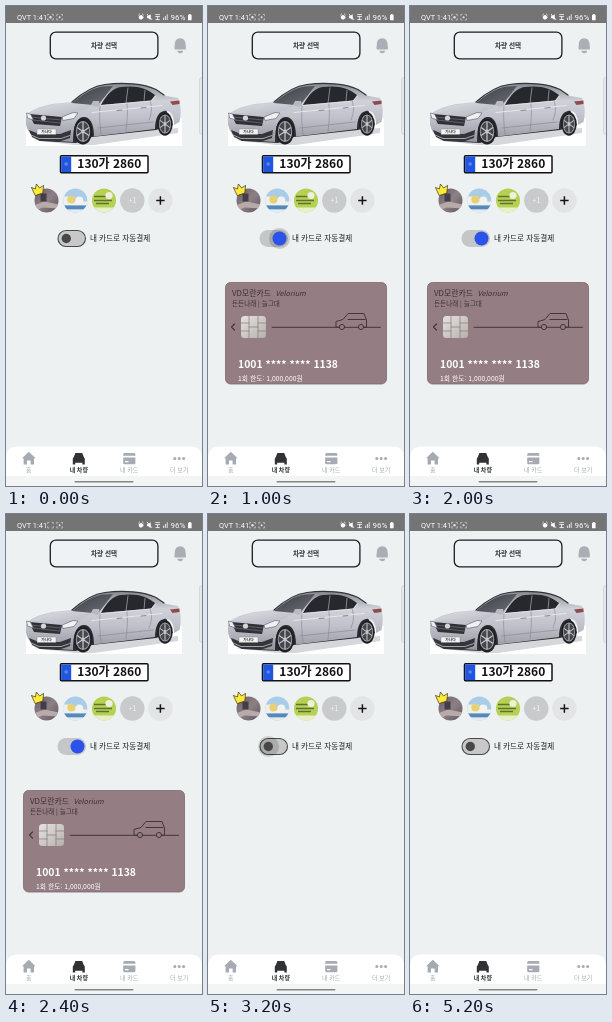
These frames come from a looping animation (196 by 480 pixels, 5.4 s). An HTML page:

```html
<!DOCTYPE html>
<html lang="ko">
<head>
<meta charset="utf-8">
<title>내 차량</title>
<style>
  html, body { margin: 0; width: 100%; height: 100%; overflow: hidden; background: #edf1f2; }
  svg { display: block; width: 196px; height: 480px; }
  text { font-family: "Noto Sans CJK KR", "Noto Sans CJK", sans-serif; }
  .mid { text-anchor: middle; }
  .bold { font-weight: 700; }
  .semi { font-weight: 500; }
  .status { font: 7.4px Roboto, sans-serif; fill: #fff; }
  .line { fill: none; stroke-linecap: round; stroke-linejoin: round; }
  .tab { font-size: 6px; font-weight: 500; text-anchor: middle; fill: #a2a6ae; }
  .tab.active { font-weight: 700; fill: #303236; }

  .on, .off, .press, .release, .blink { animation: 5.4s step-end infinite; }
  .on { animation-name: on; }
  .off { animation-name: off; }
  .press { animation-name: press; }
  .release { animation-name: release; }
  .blink { animation-name: blink; }
  @keyframes on { 0%, 59.25% { opacity: 0 } 18.51% { opacity: 1 } }
  @keyframes off { 0%, 59.25% { opacity: 1 } 18.51% { opacity: 0 } }
  @keyframes press { 0%, 22.22% { opacity: 0 } 18.51% { opacity: 1 } }
  @keyframes release { 0%, 62.96% { opacity: 0 } 59.25% { opacity: 1 } }
  @keyframes blink {
    0%, 18.51%, 37.03%, 55.55%, 70.37%, 88.88% { opacity: 1 }
    7.4%, 25.92%, 44.44%, 62.96%, 81.48% { opacity: 0 }
  }
</style>
</head>
<body>
<svg viewBox="0 0 196 480">
  <defs>
    <linearGradient id="paint" x1="0" y1="0" x2="0" y2="1">
      <stop offset="0" stop-color="#85878e"/>
      <stop offset=".3" stop-color="#d0d1d9"/>
      <stop offset=".6" stop-color="#bfc0ca"/>
      <stop offset="1" stop-color="#9596a0"/>
    </linearGradient>
    <linearGradient id="hood" x1="0" y1="0" x2="1" y2="1">
      <stop offset="0" stop-color="#dfe0e6"/>
      <stop offset="1" stop-color="#b4b5bf"/>
    </linearGradient>
    <linearGradient id="glass" x1="0" y1="0" x2="1" y2="1">
      <stop offset="0" stop-color="#3a3d43"/>
      <stop offset="1" stop-color="#6d7078"/>
    </linearGradient>
    <linearGradient id="dusk" x1="0" y1="0" x2="1" y2="1">
      <stop offset="0" stop-color="#665b64"/>
      <stop offset=".5" stop-color="#8d8085"/>
      <stop offset="1" stop-color="#5c5260"/>
    </linearGradient>
    <linearGradient id="chip" x1="0" y1="0" x2="1" y2="1">
      <stop offset="0" stop-color="#e6e3df"/>
      <stop offset="1" stop-color="#b5b0ad"/>
    </linearGradient>
    <clipPath id="round"><circle r="12"/></clipPath>
    <path id="focus" class="line" stroke="#e4e4e4" stroke-width=".6" d="M-2.8-1.4V-2.8H-1.6M1.6-2.8H2.8V-1.4M2.8 1.4V2.8H1.6M-1.6 2.8H-2.8V1.4"/>
    <g id="wheel">
      <ellipse rx="9.2" ry="13" fill="#202125"/>
      <ellipse rx="7.2" ry="10.6" fill="#a9abb1"/>
      <ellipse rx="6.4" ry="9.6" fill="#44464c"/>
      <path stroke="#c6c8cd" stroke-width="1.2" d="M0-9.6V9.6M-6-4L6 4M-6 4L6-4"/>
      <ellipse rx="1.5" ry="2.1" fill="#c6c8cd"/>
    </g>
  </defs>

  <rect width="196" height="480" fill="#edf1f2"/>

  <!-- status bar -->
  <rect width="196" height="17" fill="#747474"/>
  <text class="status" x="11" y="13.6">QVT 1:41</text>
  <use href="#focus" x="44.5" y="11.2"/>
  <circle class="blink" cx="44.5" cy="11.2" r="1.2" fill="#e4e4e4"/>
  <use href="#focus" x="53.6" y="11.2"/>
  <circle cx="53.6" cy="11.2" r="1" fill="#e4e4e4"/>
  <g class="line" stroke="#fff" stroke-width=".8">
    <circle cx="135" cy="11.3" r="1.9" fill="#fff"/>
    <path d="M132.6 9l1-1M137.4 9l-1-1"/>
    <path d="M141.5 10.2v1.8h1.2l1.6 1.4V8.8l-1.6 1.4zM141.2 8.2l4.6 5.4" fill="#fff"/>
    <path d="M149.6 8.6h4M149.6 10.6h4M151.6 10.6v3M149.8 13.6h3.6"/>
    <path d="M157.6 13.6v-1.6M159.4 13.6v-3.2M161.2 13.6V8.6"/>
  </g>
  <text class="status" x="164.6" y="13.8" style="font-size:8px">96%</text>
  <path fill="#fff" d="M182 8.8h1V8h1.6v.8h1v5.4H182z"/>

  <!-- header -->
  <rect x="44.3" y="26.2" width="107.6" height="26.6" rx="5.5" fill="#eff2f4" stroke="#1d1e20" stroke-width="1.3"/>
  <text class="mid bold" x="98" y="41.8" font-size="6.6" fill="#333">차량 선택</text>
  <path fill="#abaeb5" d="M169 43.6C168 42.6 168.6 41.6 168.8 38.4C168.9 34.6 170.8 32.4 174.2 32.2C177.6 32.4 179.500 34.600 179.600 38.400C179.800 41.600 180.400 42.600 179.400 43.600zM171.400 44.800h5.600a2.800 2.400 0 0 1-5.600 0z"/>
  <path fill="#e6eaec" stroke="#c9cdd0" stroke-width=".7" d="M196 72H194.500Q193.600 72 193.600 74V126Q193.600 128 194.500 128H196"/>

  <!-- car -->
  <path fill="#fff" d="M20 112H176V140H20z"/>
  <path fill="#d6d7da" d="M27 134L68 139H88L172 127V122L90 128z"/>
  <path fill="#2b2d32" d="M28 128L34 135 70 137 86 131 150 124 167 119 160 104 70 108z"/>
  <path fill="url(#paint)" d="M20 111C22 105 32 101 46 98L66 96C76 87 87 80 99 78.500C117 76 138 77.500 150 83.500L160 90 172 92C175 98 175.500 108 173.500 116L168 119C168 108 164 104 158 105C152 106 149 113 149 123L88 130.500C88 116 83 110 77 111C70 112 67 121 67 136L35 134C25 131 21 125 20 118z"/>
  <path class="line" stroke="#33353a" stroke-width="1.200" d="M66 96C76 87 87 80 99 78.500C117 76 138 77.500 150 83.500L158 89"/>
  <path fill="url(#hood)" d="M23 107C31 102 46 98 67 97L86 99.500C80 104 68 107 58 109L44 107z"/>
  <path fill="url(#glass)" d="M66 97C77 88 86 82 97 80.500L107 80 92 99.500z"/>
  <path fill="#26282d" d="M95 99C101 88 107 82 115 81C130 79 141 82 149 89L145 94.500z"/>
  <path stroke="#83858c" stroke-width="1" d="M122 81.500L120 97M139 84L138 95.500"/>
  <path class="line" stroke="#e9eaed" stroke-width=".7" d="M95 99.500L145 95 150 90"/>
  <path class="line" stroke="#84868f" stroke-width=".6" d="M94 100C93 110 94 119 95 128M121 98C122 108 121 116 120 125M144 95C147 102 145 109 143 114M92 122L147 116"/>
  <path class="line" stroke="#eceded" stroke-width=".9" d="M86 106.500L156 99.500"/>
  <path fill="#b8bac2" d="M85 99l2-4h6l1 4-3 2z"/>
  <path class="line" stroke="#70737b" stroke-width=".8" d="M111 104.500l5-.5M135 102l5-.5"/>
  <path fill="#8f4a50" d="M164 95.500l9.500-1V98l-7 1z"/>
  <path fill="#2f3137" d="M23 108L56 111 54 120 28 118z"/>
  <path stroke="#8b8e95" stroke-width=".5" d="M25 111L55 114M27 114L54 117"/>
  <circle cx="37.500" cy="112" r="2.600" fill="#d3d5d9"/>
  <path fill="#eef1f4" stroke="#555960" stroke-width=".6" d="M20.500 107l4 1 3 6-6-2zM56 111l11-4.500 5 .5-4 5.500-11 2z"/>
  <path fill="#33353b" d="M23 124l10 4h21l11-4-1 8-9 3H34l-8-4z"/>
  <path class="line" stroke="#d5d6da" stroke-width=".7" d="M25 129l8 3.500h22l9-3"/>
  <rect x="31" y="123" width="19" height="5.500" rx=".6" fill="#f4f4f4" stroke="#777" stroke-width=".4"/>
  <text class="mid bold" x="40.500" y="127.300" font-size="3.800" fill="#333">가나다</text>
  <use href="#wheel" transform="translate(77 125.500)"/>
  <use href="#wheel" transform="translate(159 118) scale(.84 .9)"/>

  <!-- number plate -->
  <rect x="54.500" y="149.800" width="87.500" height="17" rx="1" fill="#fff" stroke="#111" stroke-width="1.500"/>
  <rect x="55.200" y="150.500" width="10" height="15.600" fill="#1f55e0"/>
  <circle cx="60.200" cy="158" r="1.800" fill="#5c86e6"/>
  <text class="mid bold" x="103.300" y="162.400" font-size="12" fill="#111">130가 2860</text>

  <!-- members -->
  <g transform="translate(40.500 194.500)" clip-path="url(#round)">
    <rect x="-13" y="-13" width="26" height="26" fill="url(#dusk)"/>
    <path fill="#b8aaa9" d="M-13 5L-2 1 13 4V8L-4 7-13 11z"/>
    <path fill="#443d49" d="M-6-7h6v8h-6z"/>
  </g>
  <path fill="#ffe93a" stroke="#3a3510" stroke-width=".7" stroke-linejoin="round" d="M25.400 181.400l4 1.600 1-5 3.200 4 4-2.600-.8 7.600-7.600 2.600z"/>
  <g transform="translate(69.300 194.500)" clip-path="url(#round)">
    <rect x="-13" y="-13" width="26" height="26" fill="#a9cce9"/>
    <path fill="#eef0ea" d="M-13-4H-3V1H13V5H-13z"/>
    <path fill="#5588bd" d="M-13 5H13V9H-13z"/>
    <path fill="#e3ecef" d="M-13 9H13V13H-13z"/>
    <circle cx="-4" cy="-1" r="4" fill="#e6d274"/>
    <circle cx="4" cy="0" r="4" fill="#f3f2ee"/>
  </g>
  <g transform="translate(98 194.500)" clip-path="url(#round)">
    <rect x="-13" y="-13" width="26" height="26" fill="#b5d052"/>
    <path fill="#e8efc9" d="M-13 7H13V13H-13z"/>
    <path stroke="#5e7331" stroke-width="1.300" d="M-10-4H2M-10 0H8M-8 3H5"/>
    <circle cx="5" cy="-5" r="3.600" fill="#eef0dc"/>
  </g>
  <circle cx="126.300" cy="194.500" r="12.200" fill="#c9cacb"/>
  <text class="mid" x="126.300" y="197.300" font-size="7.500" fill="#f0f0f0">+1</text>
  <circle cx="154.400" cy="194.500" r="12.200" fill="#e3e4e5"/>
  <path stroke="#151515" stroke-width="1.500" d="M150.200 194.500h8.400M154.400 190.300v8.400"/>

  <!-- switch -->
  <g class="off">
    <rect x="52" y="224.500" width="27.500" height="16" rx="8" fill="#c8c8c8" stroke="#4a4a4a" stroke-width="1.100"/>
    <circle class="release" cx="60.500" cy="232.500" r="10.500" fill="#000" fill-opacity=".14"/>
    <circle cx="60.300" cy="232.500" r="4.700" fill="#474747"/>
  </g>
  <g class="on">
    <rect x="51.500" y="224" width="28.500" height="17" rx="8.500" fill="#c4c6c8"/>
    <circle class="press" cx="71.500" cy="232.500" r="10.500" fill="#000" fill-opacity=".16"/>
    <circle cx="71.500" cy="232.500" r="7" fill="#2c52ea"/>
  </g>
  <text class="semi" x="84" y="235.200" font-size="7.600" fill="#222">내 카드로 자동결제</text>

  <!-- payment card -->
  <g class="on">
    <rect x="17.500" y="276.500" width="161" height="101.500" rx="5" fill="#957e83" stroke="#7d686d" stroke-width=".8"/>
    <g fill="#3c2f34">
      <text class="semi" x="24" y="289.500" font-size="7.900">VD모란카드</text>
      <text class="semi" x="67.500" y="289.500" font-size="7.200" font-style="italic">Velorium</text>
      <text x="24" y="299.700" font-size="6.600">든든나래 | 늘그대</text>
    </g>
    <g class="line" stroke="#44363b">
      <path stroke-width="1.200" d="M26.500 318l-3 3 3 3"/>
      <path d="M64 321.300H131M137 321.300H150M156 321.300H172.500"/>
      <path d="M131 321.300H128V315.500L135 313.500 140 307.500H156L158.500 314V321.300H156M140 313.500H157"/>
      <circle cx="134" cy="321" r="2.600"/>
      <circle cx="153" cy="321" r="2.600"/>
    </g>
    <rect x="33" y="310" width="25" height="22" rx="3.500" fill="url(#chip)"/>
    <path class="line" stroke="#85797a" stroke-width=".7" d="M33 317H41M33 325H41M50 317H58M50 325H58M41 310V332M50 310V332M41 321H50"/>
    <g fill="#fff">
      <text class="bold" x="30" y="362" font-size="10.400">1001 **** **** 1138</text>
      <text class="semi" x="30" y="375" font-size="6.800">1회 한도: 1,000,000원</text>
    </g>
  </g>

  <!-- tab bar -->
  <path fill="#f3f4f4" d="M0 460H196V480H0z"/>
  <path fill="#fff" d="M0 470V452Q0 440.500 12 440.500H184Q196 440.500 196 452V470z"/>
  <g fill="#a6aab2">
    <path d="M16 452.200L22.800 445.800 29.600 452.200H28V458.600H24.600V454.400H21V458.600H17.600V452.200z"/>
    <path fill-rule="evenodd" d="M118.500 447H128Q129.400 447 129.400 448.500V457Q129.400 458.300 128 458.300H118.500Q117.200 458.300 117.200 457V448.500Q117.200 447 118.500 447zM117.200 449.800V451.600H129.400V449.800zM119 455V456.200H122.500V455z"/>
    <circle cx="168.800" cy="452.500" r="1.500"/><circle cx="173.200" cy="452.500" r="1.500"/><circle cx="177.600" cy="452.500" r="1.500"/>
  </g>
  <path fill="#303236" d="M69.400 447H76.200L77.800 451 78.800 452.500V458.400H76.400V456.800H69.200V458.400H66.800V452.500L67.800 451z"/>
  <text class="tab" x="22.800" y="466.300">홈</text>
  <text class="tab active" x="72.800" y="466.300">내 차량</text>
  <text class="tab" x="123.200" y="466.300">내 카드</text>
  <text class="tab" x="173.200" y="466.300">더 보기</text>
  <rect x="68.500" y="474.900" width="59" height="1.700" rx=".8" fill="#858585"/>
</svg>
</body>
</html>
```
